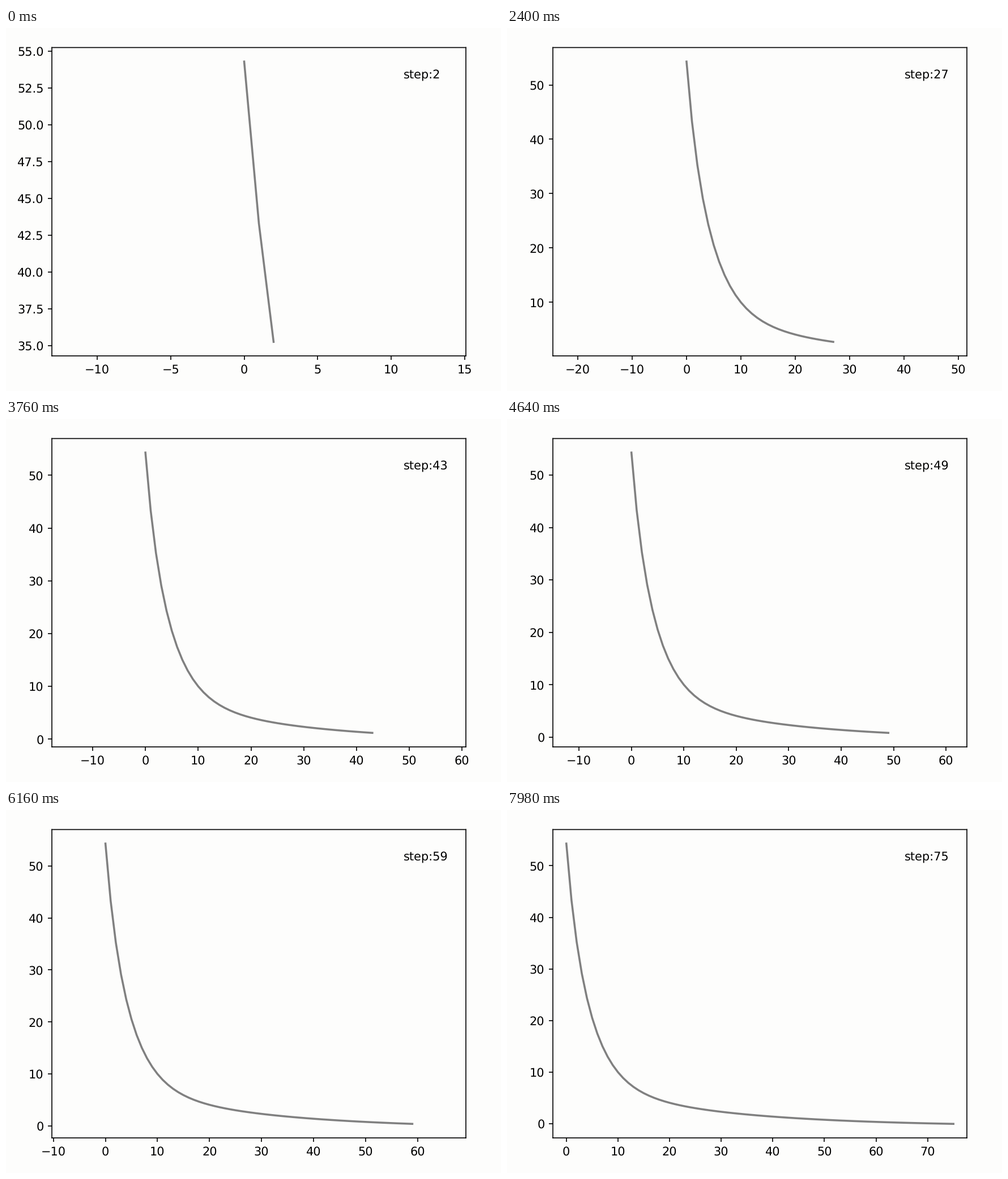
These frames come from a looping animation (874 px wide and 641 px high, 8 s). A matplotlib script:

```python
import numpy as np
import matplotlib.pyplot as plt
from matplotlib.animation import FuncAnimation

W, H, DPI = 874, 641, 144
LEFT, TOP, AW, AH = 81, 34.5, 731, 544.5  # axes box in pixels
TICK_MS, LOOP_MS, BEAT_MS = 20, 8000, 140
SCALE = 150 / DPI                         # default sizes as drawn at 150 dpi
PAPER = "#fdfdfc"

plt.rcParams.update({
    "font.family": "DejaVu Sans",
    "font.size": 10 * SCALE,
    "text.hinting": "no_hinting",
    "axes.linewidth": 0.8 * SCALE,
    "lines.linewidth": 1.7 * SCALE,
})
for axis in ("xtick", "ytick"):
    plt.rcParams[axis + ".major.size"] = 3.5 * SCALE
    plt.rcParams[axis + ".major.pad"] = 3.5 * SCALE
    plt.rcParams[axis + ".major.width"] = 0.8 * SCALE


def curve(t):
    """Decay with a fast, a medium and a slow part."""
    return (4.54 * np.exp(-0.76 * t) + 41.44 * np.exp(-0.222 * t)
            + 8.83 * np.exp(-0.0385 * t) - 0.51)


# The counter moves once per beat, at an uneven pace: (beat, step)
PACE = [(0, 2), (5, 3), (10, 8), (17, 27), (27, 43), (40, 56), (51, 65), (57, 75)]


def step_at(ms):
    beat = (ms + TICK_MS) // BEAT_MS
    return round(float(np.interp(beat, *zip(*PACE))))


fig = plt.figure(figsize=(W / DPI, H / DPI), dpi=DPI, facecolor=PAPER)
ax = fig.add_axes([LEFT / W, 1 - (TOP + AH) / H, AW / W, AH / H], facecolor=PAPER)
for spine in ax.spines.values():
    spine.set_snap(False)
line, = ax.plot([], [], color="gray")
label = ax.text(0.85, 0.9, "", transform=ax.transAxes)


def update(frame):
    n = step_at(frame * TICK_MS)
    xs = np.arange(n + 1)
    ys = curve(xs)
    line.set_data(xs, ys)
    label.set_text(f"step:{n}")
    # 5% margin in y, equal scale in x around the middle of the data
    span = ys[0] - ys[-1]
    half = 0.55 * span * AW / AH
    ax.set_ylim(ys[-1] - 0.05 * span, ys[0] + 0.05 * span)
    ax.set_xlim(n / 2 - half, n / 2 + half)
    return line, label


anim = FuncAnimation(fig, update, frames=LOOP_MS // TICK_MS,
                     init_func=lambda: update(0), interval=TICK_MS,
                     repeat=True, repeat_delay=0, blit=False)
plt.show()
```
